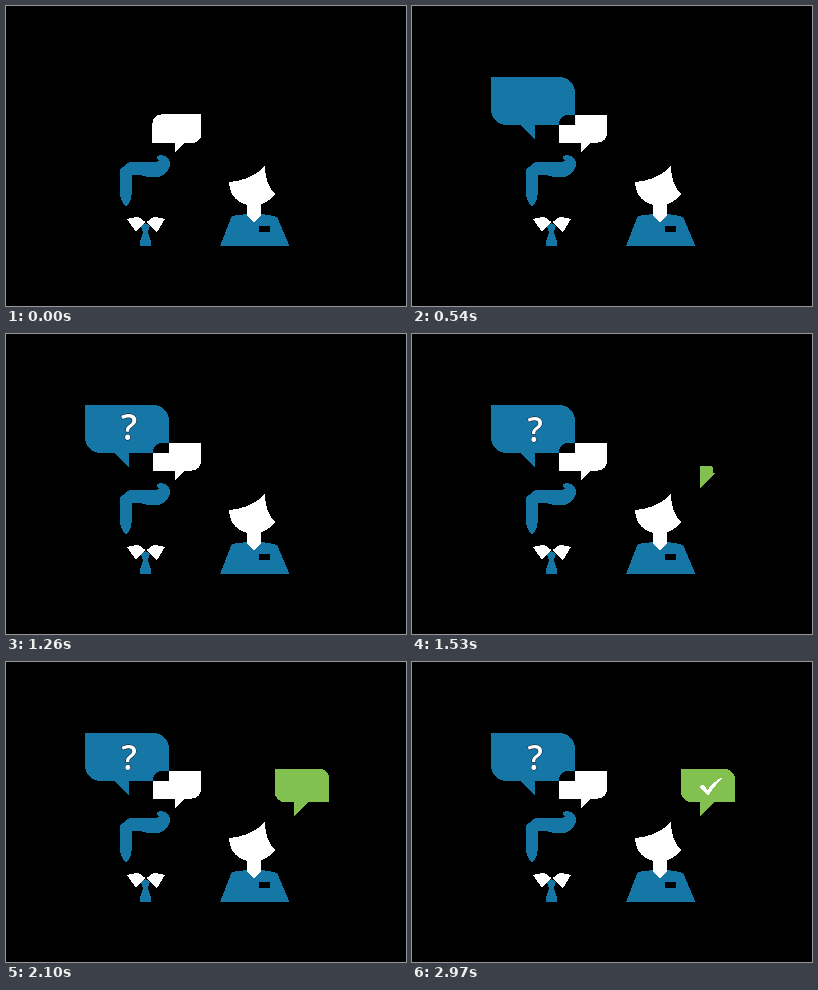
An HTML page that plays this animation: 400x300 px, repeating every 3030 ms.

```html
<!DOCTYPE html>
<html lang="en">
<head>
<meta charset="utf-8">
<title>Question and answer</title>
<style>
  html, body { margin: 0; width: 100%; height: 100%; overflow: hidden; background: #000; }
  svg { display: block; width: 100%; height: 100%; shape-rendering: crispEdges; }
  .blue { fill: #1677a6; }
  .white { fill: #fff; }
  .green { fill: #82c04f; }
  text {
    font: 600 34.5px "Open Sans", "Noto Sans", sans-serif; text-anchor: middle;
    stroke: #000; stroke-width: .8; paint-order: stroke;
  }
</style>
</head>
<body>
<svg viewBox="0 0 400 300">
  <defs><clipPath id="overlap"><path id="askClip"/></clipPath></defs>

  <g id="man">
    <path class="blue" d="M114 190V166Q114 161 119 160Q121 156 126 156H146Q152 156 153 154Q150 153 151 150Q156 148 161 151Q165 155 163.500 161Q160 171 148 171.500Q139 171 133 168.500H128Q125.500 169 125.500 172V189Q125 195 122 199L119 200Q115 195 114 190Z"/>
    <path class="white" d="M121 213L132 210.500L139.500 216L130 226ZM140.500 216L148 210.500L159 213L151 226Z"/>
    <path class="blue" d="M135 220L139.500 217L144 220L142 226L145 236V240H134V236L137 226Z"/>
  </g>

  <g id="woman">
    <path class="blue" d="M214 240L225 212Q226 210 229 209.500L241 208H256L268 210Q271 210.500 272 213L283.500 240Z"/>
    <path class="white" d="M241 197H255V209L248 217L241 209Z"/>
    <path class="white" d="M223 176Q246 174 259 160Q259 178 269 188Q261 199 247 200Q224 197 223 176Z"/>
    <rect x="253" y="220" width="11" height="6"/>
  </g>

  <path id="ask" class="blue"/>
  <path id="reply" class="white"/>
  <path id="replyCut" clip-path="url(#overlap)"/>
  <path id="answer" class="green"/>
  <text id="mark" class="white" x="123" y="108">?</text>
  <path id="check" class="white" d="M287 125L290.500 122.500Q294 125 295.500 128Q301 120 309 116L310 117Q302 124 296 134Q292 129 287 125Z"/>
</svg>
<script>
const LOOP = 3030;
const $ = id => document.getElementById(id);
const clamp = v => Math.max(0, Math.min(1, v));
const easeOut = p => 1 - (1 - p) ** 2;
const mix = (a, b, p) => a + (b - a) * p;

// tip: tail point, side: direction in which the tail widens, leaf: which diagonal is rounded
const bubbles = {
  ask:    { start: 150,  l: 79,  t: 71,  r: 163, b: 119, tip: [123, 134], tail: 19, side: -1, radius: 16, leaf: true },
  reply:  { start: -720, l: 147, t: 109, r: 195, b: 136.5, tip: [169, 146], tail: 12, side: 1, radius: 9, leaf: false },
  answer: { start: 1315, l: 269, t: 107, r: 323, b: 140, tip: [288, 154], tail: 15, side: 1, radius: 10, leaf: true }
};

// The tail comes first, then the body rises from it and widens.
function bubblePath(c, time) {
  const age = time - c.start;
  if (age <= 0) return "";
  const [x, y] = c.tip;
  const size = c.tail * clamp(age / 200) ** 2;
  const top = y - size;
  const far = x + c.side * size;
  // Both outlines run clockwise so that their union is filled.
  const tail = c.side > 0 ? `M${x} ${y}V${top}H${far}Z` : `M${x} ${y}L${far} ${top}H${x}Z`;
  if (age < 190) return tail;

  const over = 0.045 * Math.sin(Math.PI * clamp((age - 390) / 450) ** 0.7);
  const high = easeOut(clamp((age - 190) / 200)) + over;
  const wide = easeOut(clamp((age - 215) / 175)) + over;
  const base = x + c.side * (y - c.b - 1);
  const l = mix(Math.min(x, base), c.l, wide);
  const r = mix(Math.max(x, base), c.r, wide);
  const t = mix(c.b, c.t, high);
  const b = c.b + over * 18;
  const q = Math.min(c.radius * high, (r - l) / 2, (b - t) / 2);
  const [m, n] = c.leaf ? [0, q] : [q, 0];
  const arc = (k, px, py) => `A${k} ${k} 0 0 1 ${px} ${py}`;
  const body = `M${l + m} ${t}H${r - n}${arc(n, r, t + n)}V${b - m}${arc(m, r - m, b)}` +
    `H${l + n}${arc(n, l, b - n)}V${t + m}${arc(m, l + m, t)}Z`;
  return body + tail;
}

const spring = age => age <= 0 ? 0 : 1 - Math.exp(-age / 60) * Math.cos(age / 45);

function pop(el, scale, x, y, lift = 0) {
  el.setAttribute("visibility", scale > 0 ? "visible" : "hidden");
  el.setAttribute("transform", `translate(${x} ${y - lift}) scale(${scale}) translate(${-x} ${-y})`);
}

function draw(time) {
  const ask = bubblePath(bubbles.ask, time);
  const reply = bubblePath(bubbles.reply, time);
  $("ask").setAttribute("d", ask);
  $("askClip").setAttribute("d", ask);
  $("reply").setAttribute("d", reply);
  $("replyCut").setAttribute("d", reply);
  $("answer").setAttribute("d", bubblePath(bubbles.answer, time));

  const age = time - 1095;
  const lift = 5 * Math.sin(Math.PI * clamp(age / 200));
  pop($("mark"), spring(age), 123, 96, lift);
  pop($("check"), spring(time - 2100), 298.5, 125);
}

const begin = performance.now();
function tick() {
  draw((performance.now() - begin) % LOOP);
  requestAnimationFrame(tick);
}
draw(0);
requestAnimationFrame(tick);
</script>
</body>
</html>
```
